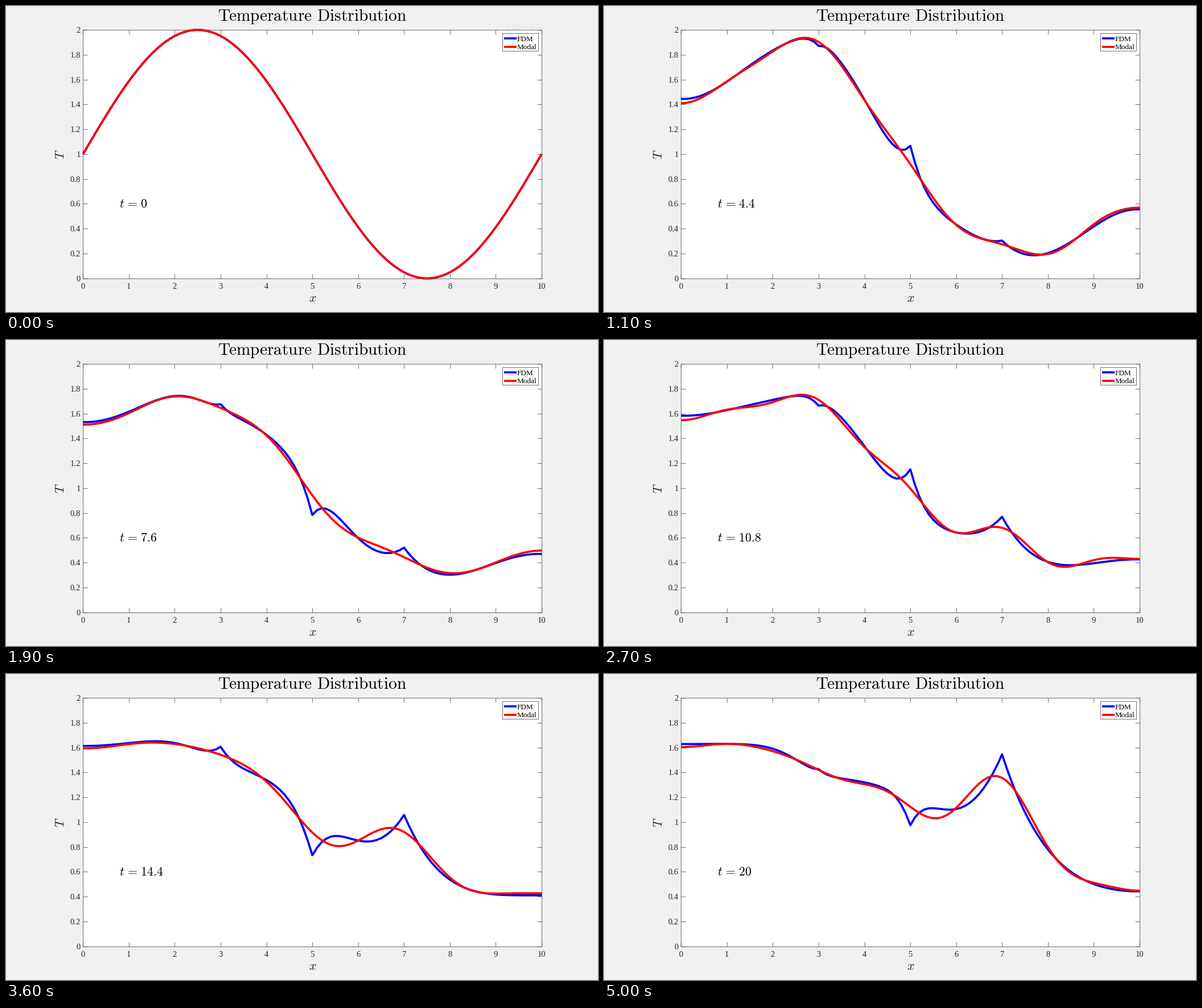
Recreate the animation shown at these times as a matplotlib script. Size 1040 by 539 pixels, loop 5.1 s.

```python
import numpy as np
import matplotlib.pyplot as plt
from matplotlib.animation import FuncAnimation
from matplotlib.lines import Line2D
from matplotlib.patches import Circle, Rectangle

W, H, DPI = 1040, 539, 100
LEFT, RIGHT, TOP, BOTTOM = 135.3, 941.0, 42.1, 479.8
BACK, INK, FAINT = "#f0f0f0", "#262626", "#e2e2e2"
RULE = 0.65
FRAMES, FRAME_TIME = 51, 0.4

# Heat equation on a rod with insulated ends and three point sources
LENGTH, ALPHA, DX, DT = 10.0, 0.1, 0.1, 0.04
MODES = 10
SOURCE_X = np.array([3.0, 5.0, 7.0])

x = np.linspace(0, LENGTH, 101)
start = 1 + np.sin(2 * np.pi * x / LENGTH)


def sources(t):
    return np.array([0.1 * np.sin(t - np.pi / 4), -0.2 * np.sin(t), 0.01 * t])


def solve():
    """Return the finite difference and modal profiles of every frame."""
    nodes = np.rint(SOURCE_X / DX).astype(int)
    n = np.arange(MODES + 1)
    wave = n * np.pi / LENGTH
    scale = np.where(n == 0, 1, 2) / LENGTH
    shapes = np.cos(np.outer(x, wave))
    drive = scale[:, None] * np.cos(np.outer(wave, SOURCE_X))

    fine = (np.arange(4000) + 0.5) * LENGTH / 4000
    fine_start = 1 + np.sin(2 * np.pi * fine / LENGTH)
    modal = scale * (np.cos(np.outer(wave, fine)) @ fine_start) * LENGTH / 4000
    decay = np.exp(-ALPHA * wave ** 2 * DT)

    grid = start.copy()
    profiles = [(start, start)]
    per_frame = round(FRAME_TIME / DT)
    for step in range(1, (FRAMES - 1) * per_frame + 1):
        grid[1:-1] += DT * ALPHA * np.diff(grid, 2) / DX ** 2
        grid[nodes] += DT * sources(step * DT) / DX
        grid[0], grid[-1] = grid[1], grid[-2]
        middle = sources((step - 0.5) * DT)
        modal = modal * decay + DT * np.sqrt(decay) * (drive @ middle)
        if step % per_frame == 0:
            profiles.append((grid.copy(), shapes @ modal))
    return profiles


def pt(pixels):
    return pixels * 72 / DPI


plt.rcParams["font.family"] = "Liberation Serif"
plt.rcParams["mathtext.fontset"] = "cm"
fig = plt.figure(figsize=(W / DPI, H / DPI), dpi=DPI, facecolor=BACK)
ax = fig.add_axes([LEFT / W, 1 - BOTTOM / H, (RIGHT - LEFT) / W, (BOTTOM - TOP) / H])
ax.set(xlim=(0, LENGTH), ylim=(0, 2), xticks=np.arange(11), yticks=np.arange(11) / 5)
ax.tick_params(direction="in", length=pt(8), width=pt(RULE), color=INK,
               top=True, right=True, labelbottom=False, labelleft=False)
for spine in ax.spines.values():
    spine.set(linewidth=pt(RULE), color=INK)

# Overlay measured in pixels from the top left corner
over = fig.add_axes([0, 0, 1, 1], facecolor="none")
over.set(xlim=(0, W), ylim=(H, 0))
over.axis("off")


def label(px, py, text, size, color="black", ha="center", **extra):
    return over.text(px, py, text, fontsize=pt(size), color=color, ha=ha,
                     va="baseline", **extra)


def stroke(xs, ys, color, width):
    return over.add_line(Line2D(xs, ys, color=color, linewidth=pt(width),
                                solid_capstyle="butt"))


for i in range(11):
    label(LEFT + (RIGHT - LEFT) * i / 10, 498, f"{i}", 14.67, INK)
    label(131, BOTTOM - (BOTTOM - TOP) * i / 10 + 5, f"{i / 5:g}", 14.67, INK, "right")

label(538.3, 26.5, r"$\mathrm{T\hspace{-0.063}emperature\hspace{0.38}Distribution}$", 29.33)
label(538.3, 521, "$x$", 22, INK)
label(102.5, 261, "$T$", 22, INK, rotation=90, rotation_mode="anchor")
clock = label(199, 355, "", 22, ha="left")

over.add_patch(Rectangle((872, 48), 63, 31, facecolor="white",
                         edgecolor=INK, linewidth=pt(RULE)))
for row, (name, color) in enumerate([("FDM", "blue"), ("Modal", "red")]):
    stroke([875, 897], [56.8 + 14.8 * row] * 2, color, 3.7)
    label(898, 61.5 + 14.8 * row, name, 13.2, ha="left")

# Faint axes toolbar, seen only at the very start
toolbar = [stroke([877, 884], [40, 33], FAINT, 1.5)]
for left in (889, 900):
    toolbar.append(over.add_patch(Rectangle((left, 32.5), 7, 7, fill=False,
                                            edgecolor=FAINT, linewidth=pt(1))))
for left in (914, 925, 936):
    toolbar.append(over.add_patch(Circle((left, 35.5), 3, fill=False,
                                         edgecolor=FAINT, linewidth=pt(1))))
    toolbar.append(stroke([left + 2, left + 4], [37.5, 40], FAINT, 1))

curves = [ax.plot(x, start, color=color, linewidth=pt(3.7), clip_on=False, zorder=5,
                  solid_capstyle="butt", solid_joinstyle="round")[0]
          for color in ("blue", "red")]
profiles = solve()


def draw(frame):
    for curve, profile in zip(curves, profiles[frame]):
        curve.set_ydata(profile)
    clock.set_text(rf"$t\hspace{{0.116}}=\hspace{{0.116}}{frame * FRAME_TIME:g}$")
    for icon in toolbar:
        icon.set_visible(frame == 0)
    return [*curves, clock, *toolbar]


animation = FuncAnimation(fig, draw, frames=FRAMES, interval=100, repeat=True)
plt.show()
```
